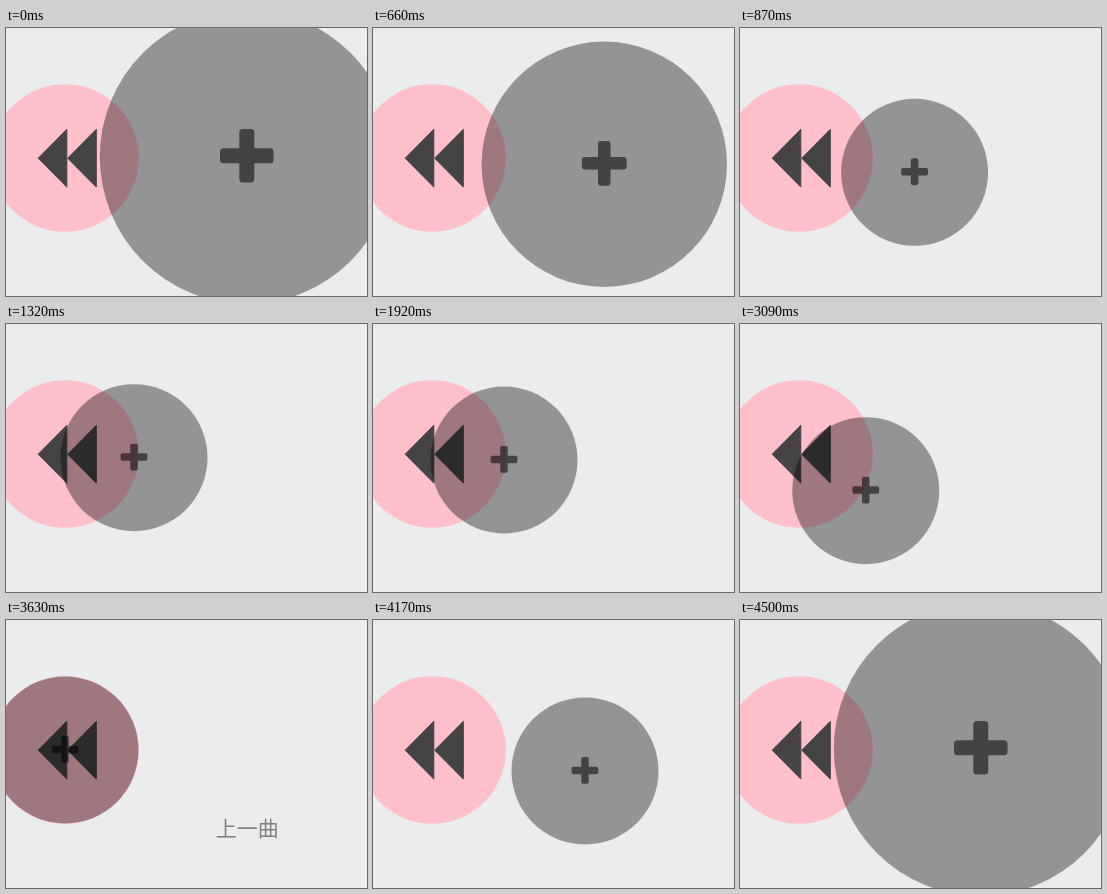
Recreate the animation shown at these times as an HTML page. Size 361 by 268 pixels, loop 5.13 s.

```html
<!DOCTYPE html>
<html lang="zh">
<head>
<meta charset="utf-8">
<style>
  html, body { margin: 0; width: 100%; height: 100%; overflow: hidden; background: #eaecee; }
  svg { display: block; width: 100%; height: 100%; }
  text { font: 300 21px "Noto Sans CJK SC", "Noto Sans CJK", sans-serif; fill: #808080; }
</style>
</head>
<body>
<svg viewBox="0 0 361 268">
  <defs>
    <path id="arrow" d="M0 0L28.6 -28.9V28.9Z" fill="#444" stroke="#444" stroke-linejoin="round"/>
    <rect id="bar" x="-13.4" y="-3.75" width="26.8" height="7.5" rx="1.8"/>
  </defs>
  <circle cx="59" cy="130" r="73.8" fill="#ffc0cb"/>
  <use href="#arrow" x="32.2" y="130.2"/>
  <use href="#arrow" x="61.7" y="130.2"/>
  <g id="button">
    <circle r="73.5" opacity=".375"/>
    <g opacity=".54" transform="translate(0 -.6)">
      <use href="#bar"/>
      <use href="#bar" transform="rotate(90)"/>
    </g>
  </g>
  <text id="label" x="209.7" y="216">上一曲</text>
</svg>
<script>
const LOOP = 5130, TICK = 30;
const button = document.getElementById('button');
const label = document.getElementById('label');

const linear = p => p;
const out = p => 1 - (1 - p) ** 1.8;
const inOut = p => p * p * (3 - 2 * p);
const at = (x, y, s = 1) => ({ x, y, s });

// places the button rests at or is dragged through
const home = at(240.8, 129, 2), grip = at(212, 151), dock = at(59, 130);
const edge = at(133, 137), near = at(128, 133.7), pulled = at(131, 136);
const low = at(146, 165), left = at(122, 166.5);

// between moves the button holds still
const moves = [
  { from: 630, to: 780, goal: grip, ease: out },
  { from: 780, to: 1080, goal: edge, ease: out },
  { from: 1170, to: 1320, goal: near, ease: inOut },
  { from: 1320, to: 1620, goal: dock, ease: out },
  { from: 1890, to: 1920, goal: pulled, ease: linear },
  { from: 1920, to: 2430, goal: low, ease: inOut },
  { from: 2430, to: 2820, goal: at(131, 167), ease: inOut },
  { from: 2940, to: 3210, goal: left, ease: inOut },
  { from: 3360, to: 3600, goal: dock, ease: out },
  { from: 4110, to: 4170, goal: grip, ease: linear },
  { from: 4290, to: 4500, goal: home, ease: out }
];

function pose(t) {
  let { x, y, s } = home;
  for (const { from, to, goal, ease } of moves) {
    if (t < from) break;
    const p = ease(Math.min(1, (t - from) / (to - from)));
    x += (goal.x - x) * p;
    y += (goal.y - y) * p;
    s += (goal.s - s) * p;
  }
  return { x, y, s };
}

const within = (t, from, to) => t >= from && t < to;

function draw(t) {
  const { x, y, s } = pose(t);
  button.setAttribute('transform', `translate(${x} ${y}) scale(${s})`);
  const named = within(t, 1620, 1920) || within(t, 3600, 3960);
  label.setAttribute('visibility', named ? 'visible' : 'hidden');
}

const start = performance.now();
function loop() {
  const t = (performance.now() - start) % LOOP;
  draw(Math.floor(t / TICK) * TICK);
  requestAnimationFrame(loop);
}
loop();
</script>
</body>
</html>
```
